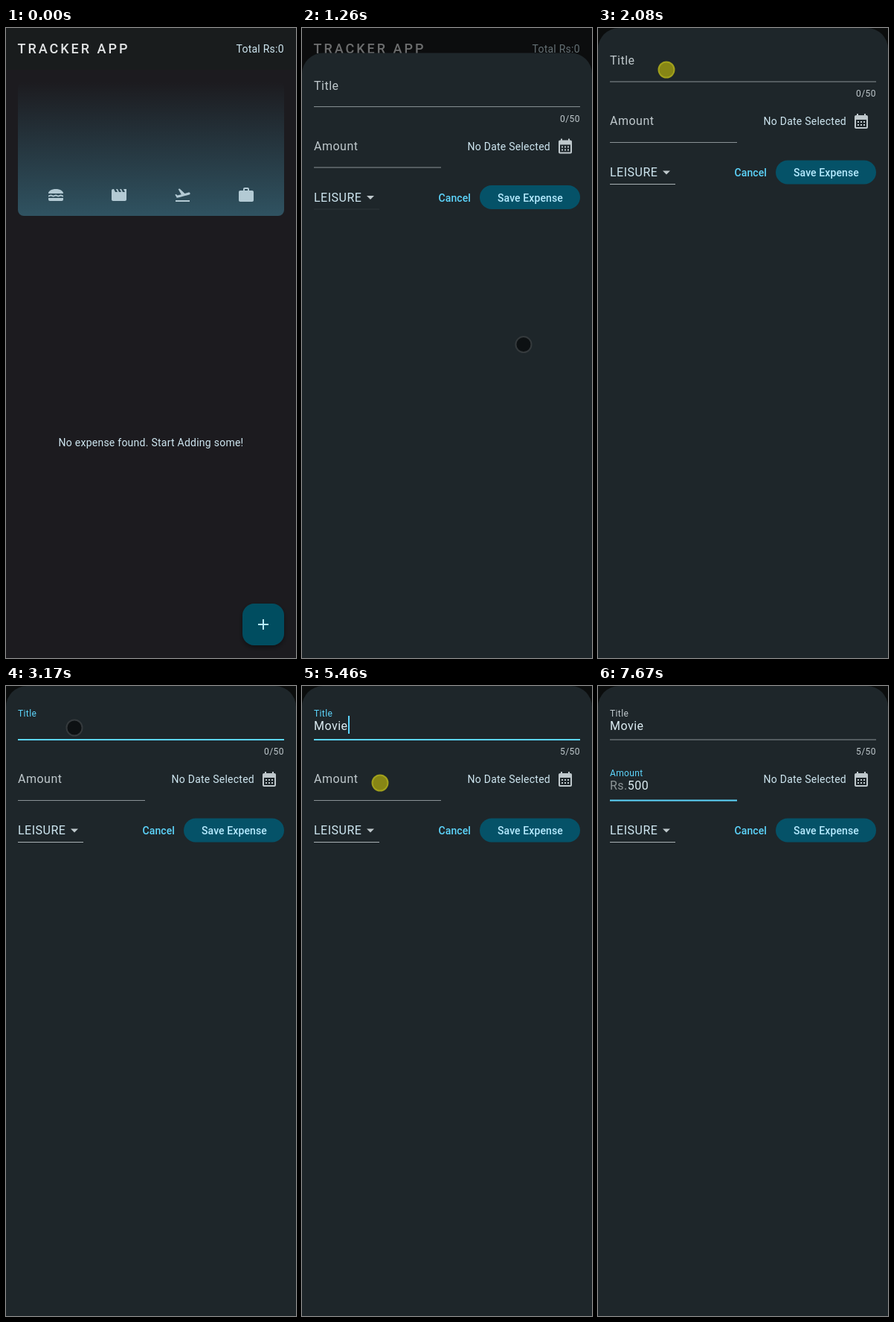
An HTML page that plays this animation: 390x845 px, repeating every 8000 ms.

```html
<!DOCTYPE html>
<html lang="en">
<head>
<meta charset="utf-8">
<title>Expense form</title>
<style>
  html, body { margin: 0; width: 100%; height: 100%; overflow: hidden; background: #1c1b1f; }
  svg { display: block; width: 390px; height: 845px; }
  text { font: 400 14px Roboto, sans-serif; letter-spacing: .25px; fill: #cee6f0; white-space: pre; }
  .heading { font-size: 18px; font-weight: 500; letter-spacing: 3px; fill: #e1e3e4; }
  .large { font-size: 16px; letter-spacing: .5px; }
  .small { font-size: 12px; letter-spacing: .4px; fill: #bfc8cc; }
  .button { font-weight: 500; letter-spacing: .1px; }
  .value { fill: #dcecf2; }
  .prefix { fill: #8d9597; }
  .icons { fill: #b3cad4; }
</style>
</head>
<body>
<svg viewBox="0 0 390 845">
  <defs>
    <linearGradient id="glow" x1="0" y1="1" x2="0" y2="0">
      <stop stop-color="#5dd5fc" stop-opacity=".3"/>
      <stop offset="1" stop-color="#5dd5fc" stop-opacity="0"/>
    </linearGradient>
    <filter id="shadow" x="-30%" y="-30%" width="160%" height="170%">
      <feDropShadow dx="0" dy="3" stdDeviation="3" flood-color="#000" flood-opacity=".4"/>
    </filter>
  </defs>

  <rect width="390" height="845" fill="#1c1b1f"/>
  <rect width="390" height="56" fill="#191c1d"/>
  <text class="heading" x="15.5" y="34">TRACKER APP</text>
  <text x="309.5" y="33">Total Rs:0</text>
  <rect x="16" y="72" width="358" height="180" rx="8" fill="url(#glow)"/>
  <g class="icons">
    <g transform="translate(55 212)">
      <path d="M22 10c.32-3.28-4.28-6-10-6S1.7 6.72 2 10zM2 16h20v2c0 1.1-.9 2-2 2H4c-1.1 0-2-.9-2-2z"/>
      <path d="M2 13.5c1.7 0 1.7-1 3.35-1s1.65 1 3.3 1 1.7-1 3.35-1 1.65 1 3.3 1 1.7-1 3.35-1 1.65 1 3.35 1" fill="none" stroke="#b3cad4" stroke-width="2"/>
    </g>
    <path transform="translate(140 212)" d="M18 4l2 4h-3l-2-4h-2l2 4h-3l-2-4H8l2 4H7L5 4H4c-1.1 0-2 .9-2 2v12c0 1.1.9 2 2 2h16c1.1 0 2-.9 2-2V4z"/>
    <path transform="translate(225.5 212)" d="M2.5 19h19v2h-19zm19.57-9.36c-.21-.8-1.04-1.28-1.84-1.06L14.92 10l-6.9-6.43-1.93.51 4.14 7.17-4.97 1.33-1.97-1.54-1.45.39 2.59 4.49s7.12-1.9 16.57-4.43c.81-.23 1.28-1.05 1.07-1.85z"/>
    <path transform="translate(311 212)" d="M20 6h-4V4c0-1.1-.9-2-2-2h-4c-1.1 0-2 .9-2 2v2H4c-1.1 0-2 .9-2 2v11c0 1.1.9 2 2 2h16c1.1 0 2-.9 2-2V8c0-1.1-.9-2-2-2zm-6 0h-4V4h4z"/>
  </g>
  <text x="195" y="561" text-anchor="middle">No expense found. Start Adding some!</text>
  <rect x="318" y="772" width="56" height="56" rx="16" fill="#004e60" filter="url(#shadow)"/>
  <path d="M339 800h14M346 793v14" stroke="#b6ebff" stroke-width="2"/>

  <rect id="barrier" width="390" height="845"/>
  <g id="sheet">
    <path d="M0 845V28A28 28 0 0 1 28 0H362A28 28 0 0 1 390 28V845z" fill="#1e262a"/>
    <text id="titleLabel" class="large">Title</text>
    <text id="titleText" class="large value" x="16" y="59"></text>
    <path id="titleLine" d="M16 72H374"/>
    <text id="counter" class="small" x="347" y="92"></text>

    <text id="amountLabel" class="large">Amount</text>
    <text id="amountText" class="large value" x="16" y="139"><tspan class="prefix">Rs.</tspan><tspan id="digits"></tspan></text>
    <path id="amountLine" d="M16 153.5H187"/>
    <rect id="caret" width="2" height="24" fill="#5dd5fc"/>

    <text x="222.5" y="130">No Date Selected</text>
    <path transform="translate(342 113)" fill="#bfc8cc" fill-rule="evenodd" d="M19 4h-1V2h-2v2H8V2H6v2H5c-1.1 0-2 .9-2 2v14c0 1.1.9 2 2 2h14c1.1 0 2-.9 2-2V6c0-1.1-.9-2-2-2zm0 16H5V10h14zM9 14H7v-2h2zm4 0h-2v-2h2zm4 0h-2v-2h2zm-8 4H7v-2h2zm4 0h-2v-2h2zm4 0h-2v-2h2z"/>

    <text class="large" x="16" y="199">LEISURE</text>
    <path d="M87 191.5h10l-5 5z" fill="#bfc8cc"/>
    <path id="menuLine" d="M16 209.5H104" stroke="#a9b1b4"/>
    <text class="button" x="183.5" y="199" style="fill:#5dd5fc">Cancel</text>
    <rect x="239" y="177.5" width="135" height="32" rx="16" fill="#055268"/>
    <text class="button" x="263" y="199" style="fill:#b6ebff">Save Expense</text>
  </g>
  <circle id="pointer" r="10.5" stroke-width="2"/>
</svg>
<script>
const LOOP = 8000;
const el = Object.fromEntries([...document.querySelectorAll('[id]')].map(e => [e.id, e]));
const ramp = (t, from, to) => Math.min(1, Math.max(0, (t - from) / (to - from)));
const mix = (a, b, p) => a + (b - a) * p;
const smooth = p => p * p * (3 - 2 * p);
const within = (t, spans) => spans.some(([from, to]) => t >= from && t < to);
const set = (e, attrs) => Object.entries(attrs).forEach(([k, v]) => e.setAttribute(k, v));
const typed = (text, times, t) => text.slice(0, times.filter(at => t >= at).length);

const GREY = [138, 146, 150], PALE = [191, 200, 204], CYAN = [93, 213, 252];
const tint = (from, p) => `rgb(${from.map((c, i) => Math.round(mix(c, CYAN[i], p)))})`;

// time, x, y
const pointerPath = [
  [70, 373, 838], [390, 361.5, 795], [1060, 361.5, 795], [1260, 298.5, 425.5],
  [1500, 175, 190], [1850, 92, 56], [5100, 92, 56], [5380, 105, 130],
  [5560, 105, 130], [5900, 166.5, 206.5], [7520, 166.5, 206.5], [7600, 329, 125]
];
const presses = [[920, 1060], [1950, 2770], [5400, 5560]];
const titleCaret = [[2690, 3170], [3240, 4570], [5080, 5480]];
const amountCaret = [[5620, 6120], [6580, 7630]];

function pointAt(t) {
  let i = 0;
  while (i < pointerPath.length - 2 && t >= pointerPath[i + 1][0]) i++;
  const [t0, x0, y0] = pointerPath[i], [t1, x1, y1] = pointerPath[i + 1];
  const p = ramp(t, t0, t1);
  return [mix(x0, x1, p), mix(y0, y1, p)];
}

function drawField(label, line, restY, floatY, floated, focus) {
  set(label, { transform: `translate(16 ${mix(restY, floatY, floated)}) scale(${mix(1, .75, floated)})` });
  label.style.fill = tint(PALE, focus);
  set(line, { stroke: tint(GREY, focus), 'stroke-width': mix(1, 2, focus) });
}

function draw(t) {
  const opened = 1 - (1 - ramp(t, 1078, 1328)) ** 2.45;
  const sheetY = 845 * (1 - opened);
  set(el.sheet, { transform: `translate(0 ${sheetY})` });
  set(el.barrier, { opacity: .54 * opened });
  set(el.menuLine, { opacity: sheetY > 0 ? .1 : 1 });

  const titleFloat = smooth(ramp(t, 2150, 2330));
  const amountFloat = smooth(ramp(t, 5480, 5650));
  drawField(el.titleLabel, el.titleLine, 49, 41, titleFloat, titleFloat - amountFloat);
  drawField(el.amountLabel, el.amountLine, 130, 121, amountFloat, amountFloat);

  const title = typed('Movie', [3240, 3370, 3700, 3960, 4090], t);
  el.titleText.textContent = title;
  el.counter.textContent = title.length + '/50';
  el.digits.textContent = typed('500', [6710, 6910, 7130], t);
  set(el.amountText, { opacity: amountFloat });

  const inAmount = t >= 5480;
  const field = inAmount ? el.amountText : el.titleText;
  const width = field.textContent ? field.getComputedTextLength() : 0;
  set(el.caret, {
    x: Math.round(16 + width),
    y: inAmount ? 120 : 40,
    visibility: within(t, inAmount ? amountCaret : titleCaret) ? 'visible' : 'hidden'
  });

  const [cx, cy] = pointAt(t), pressed = within(t, presses);
  set(el.pointer, {
    cx, cy,
    fill: pressed ? 'rgba(240,230,0,.5)' : 'rgba(0,0,0,.55)',
    stroke: pressed ? 'rgba(170,168,28,.9)' : 'rgba(60,65,68,.8)',
    visibility: t >= 70 && t < 7665 ? 'visible' : 'hidden'
  });
}

function tick() {
  draw(performance.now() % LOOP);
  requestAnimationFrame(tick);
}
tick();
</script>
</body>
</html>
```
